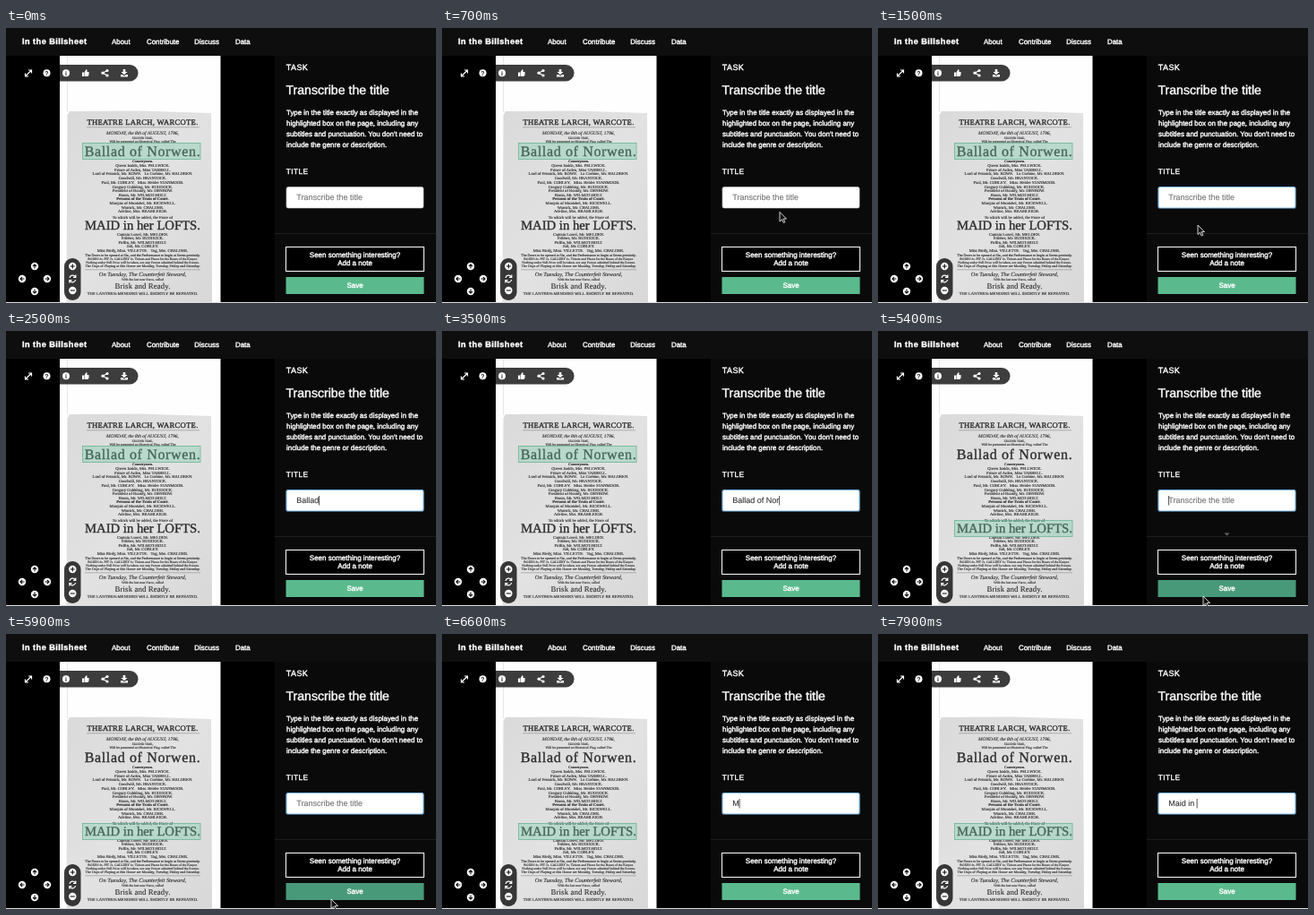
These frames come from a looping animation (480 px wide and 307 px high, 8000 ms). An HTML page:

```html
<!DOCTYPE html>
<html lang="en">
<head>
<meta charset="utf-8">
<title>Transcribe the title</title>
<style>
  html, body { margin: 0; width: 100%; height: 100%; overflow: hidden; background: #000; }
  svg { display: block; width: 100vw; height: 100vh; }
  text { font-family: "Liberation Sans", Arial, sans-serif; white-space: pre; text-rendering: geometricPrecision; }
  .ui text { fill: #fff; stroke: #fff; stroke-width: .4px; }
  .ui .dim { fill: #777; stroke: #777; stroke-width: .15px; }
  .ui .typed { fill: #333; stroke: #333; stroke-width: .1px; }
  .bold { font-weight: bold; }
  .mid { text-anchor: middle; }
  #bill text { font-family: "Liberation Serif", Times, serif; text-anchor: middle; fill: #2c2c2c; stroke: #2c2c2c; stroke-width: .12px; }
  #bill .large { stroke-width: .35px; }
  #bill .italic { font-style: italic; }
  .line { fill: none; stroke: #fff; stroke-width: 1.2; }
  .dark { fill: none; stroke: #111; stroke-width: 1.1; }
</style>
</head>
<body>
<svg viewBox="0 0 480 307">
  <defs>
    <linearGradient id="paper" x2="1" y2="1">
      <stop offset="0" stop-color="#dadada"/>
      <stop offset=".5" stop-color="#e2e2e2"/>
      <stop offset="1" stop-color="#d8d8d8"/>
    </linearGradient>
  </defs>
  <rect width="480" height="307"/>
  <rect width="480" height="31" fill="#0e0e0e"/>
  <rect x="300" y="31" width="180" height="276" fill="#0a0a0a"/>

  <rect x="60" y="31" width="179.5" height="276" fill="#fefefe"/>
  <path d="M68.5 31V94" stroke="#ddd" stroke-width=".7"/>
  <path d="M68.5 97 71 93 150 92.5 229 95 230 307H67.5Z" fill="url(#paper)"/>
  <g id="bill"></g>
  <rect id="mark" x="85.5" width="131.5" height="18" fill="#6fc9a6" fill-opacity=".36" stroke="#6db596" stroke-width=".8"/>

  <g class="ui">
    <rect x="11" y="41" width="136.5" height="18.5" rx="9.2" fill="#000" fill-opacity=".76"/>
    <g id="tools" fill="#fff">
      <path class="line" d="M22 53.5 28 47.5M25 47H28.5V50.5M21.5 50.5V54H25"/>
      <path d="M85 49.5H87V54H85ZM87.5 49.5 89.5 46.3Q91.3 46.5 90.3 49H92.5Q93 53.8 91 54H87.5Z"/>
      <path class="line" d="M113 47.5 108 50.2 113 53"/>
      <circle cx="113" cy="47.5" r="1.6"/><circle cx="108" cy="50.2" r="1.6"/><circle cx="113" cy="53" r="1.6"/>
      <path d="M130.7 46H133.3V49H135.5L132 52.3 128.5 49H130.7ZM128 52H130L132 53.6 134 52H136V54.5H128Z"/>
    </g>
    <rect x="65" y="257" width="18.5" height="47" rx="9" fill="#000" fill-opacity=".76"/>
    <g id="pads" fill="#fff"></g>

    <path d="M300 229.5H480" stroke="#1d1d1d"/>
    <path id="notch" d="M386.5 225.5H392.5L389.5 228.5Z" fill="#666"/>
    <g id="panel"></g>
    <rect id="field" x="313" y="177.5" width="153" height="23.5" rx="2" fill="#fff"/>
    <text id="entry" x="324.3" y="192.3" font-size="9"></text>
    <path id="caret" stroke="#222" stroke-width=".8"/>
    <rect x="312.5" y="244.5" width="154" height="27" fill="#000" stroke="#fff"/>
    <rect id="save" x="312.5" y="278" width="154" height="19"/>
    <g id="labels"></g>
  </g>
  <rect y="306" width="480" height="1" fill="#ddd"/>
  <path id="pointer" d="M0 0V10.5L2.5 8.2 4.2 12 5.8 11.3 4.2 7.6H7.5Z" fill="#111" stroke="#fff" stroke-width=".8"/>
</svg>
<script>
const $ = id => document.getElementById(id);
const text = (s, x, y, size, cls = '', gap = 0) =>
  `<text x="${x}" y="${y}" font-size="${size}" class="${cls}" letter-spacing="${gap}">${s}</text>`;

// Playbill lines: text, baseline, size, class, letter spacing
$('bill').innerHTML = [
  ['THEATRE LARCH, WARCOTE.', 108, 8.6, 'large', .3],
  ['MONDAY, the 8th of AUGUST, 1796,', 119, 5.4, 'italic'],
  ['SECOND TIME,', 124, 3.4],
  ['Will be presented an Historical Play, called The', 128.3, 3.9],
  ['Ballad of Norwen.', 143.2, 16, 'large', .65],
  ['Countrymen.', 150, 4, 'bold'],
  ['Queen Isolda, Mrs. PELLWICK.', 154.8, 4.6],
  ['Prince of Arden, Miss TARBELL.', 159.6, 4.6],
  ['Lord of Fennick, Mr. ROWE.   La Corbine, Mr. HALDREN.', 164.4, 4.6],
  ['Goodwill, Mr. BRANTOCK.', 169.2, 4.6],
  ['Paul, Mr. COBLEY.   Miss. Helder STANMOOR.', 174, 4.6],
  ['Gregory Gubbling, Mr. RUDDOCK.', 178.6, 4.6],
  ['President of Bounty, Mr. DENBOW.', 183.2, 4.6],
  ['Baron, Mr. WILMOT-HOLT.', 187.6, 4.6],
  ['Persons of the Train of Court.', 192.4, 4.6, 'bold'],
  ['Marquis of Montabel, Mr. RICKWELL.', 197.2, 4.6],
  ['Warrick, Mr. CHALDER.', 201.6, 4.6],
  ['Adeline, Mrs. BRAMLEIGH.', 206, 4.6],
  ['To which will be added, the Farce of', 213, 4.6],
  ['MAID in her LOFTS.', 225, 14.7, 'large'],
  ['Captain Lorrel, Mr. MELDEN.', 232, 4.6],
  ['Fribber, Mr. RUDDOCK.', 236.4, 4.6],
  ['Puffin, Mr. WILMOT-HOLT.', 240.8, 4.6],
  ['Jolt, Mr. COBLEY.', 245, 4.6],
  ['Miss Birdy, Miss. VILLETTE.   Tag, Mrs. CHALDER.', 249.5, 4.6],
  ['The Doors to be opened at Six, and the Performance to begin at Seven precisely.', 254.5, 4],
  ['BOXES 4s. PIT 2s. GALLERY 1s. Tickets and Places for the Boxes of the Keeper.', 258.6, 3.7],
  ['Nothing under Full Price will be taken, nor any Person admitted behind the Scenes.', 262.8, 3.8],
  ['The Days of Playing at this House are Monday, Tuesday, Friday and Saturday.', 267.2, 4.1],
  ['On Tuesday, The Counterfeit Steward,', 276.5, 6.4, 'italic'],
  ['With the last new Farce, called', 282, 3.8],
  ['Brisk and Ready.', 291, 8.8, '', .1],
  ['THE LANTERN-MENDERS WILL SHORTLY BE REPEATED.', 298, 4.7]
].map(([s, ...rest]) => text(s, 152.5, ...rest)).join('') +
  '<path d="M90 110.8H216M88 269.8H217" stroke="#777" stroke-width=".5"/>';

const badge = (s, x) => `<circle cx="${x}" cy="50.3" r="4"/>` +
  `<text x="${x}" y="52.8" font-size="7" class="mid bold" style="fill:#222;stroke:none">${s}</text>`;
$('tools').innerHTML += badge('?', 45.5) + badge('i', 67);

const pad = (x, y, d, turn = 0) => `<g transform="translate(${x} ${y}) rotate(${turn})">
  <circle r="4.2"/><path class="dark" d="${d}"/></g>`;
const arrow = 'M0 2.6V-2M-2.1 .2 0-2.1 2.1 .2';
$('pads').innerHTML = pad(32, 266, arrow) + pad(46, 280, arrow, 90) +
  pad(32, 294, arrow, 180) + pad(18, 280, arrow, 270) +
  pad(74.3, 266, 'M-2.5 0H2.5M0-2.5V2.5') + pad(74.3, 293, 'M-2.5 0H2.5') +
  '<path class="line" d="M71 279A3.5 3.5 0 0 1 77.4 277.7M77.8 275.5V278.3H75M77.6 281A3.5 3.5 0 0 1 71.2 282.3M70.8 284.5V281.7H73.6"/>';

$('panel').innerHTML =
  text('In the Billsheet', 18, 18, 9.2, 'bold', .45) +
  [['About', 118], ['Contribute', 157], ['Discuss', 210.3], ['Data', 256]]
    .map(([s, x]) => text(s, x, 18, 7.9)).join('') +
  text('TASK', 312.8, 46.5, 9, '', .4) +
  text('Transcribe the title', 312.5, 74.3, 14.1) +
  ['Type in the title exactly as displayed in the',
   'highlighted box on the page, including any',
   'subtitles and punctuation. You don\'t need to',
   'include the genre or description.']
    .map((s, i) => text(s, 313, 96.7 + i * 12, 7.88)).join('') +
  text('TITLE', 312.8, 163, 8.3, '', .4);

$('labels').innerHTML =
  text('Seen something interesting?', 389.5, 256.3, 8, 'mid') +
  text('Add a note', 389.5, 265.2, 8, 'mid') +
  text('Save', 389.5, 290, 8, 'mid');

const LOOP = 8000, FOCUS = 1000, SUBMIT = 5300;
const rounds = [
  { title: 'Ballad of Norwen', start: 1700, step: 150, focus: FOCUS, y: 128.5 },
  { title: 'Maid in her Lofts', start: 6500, step: 180, focus: SUBMIT, y: 211.5 }
];
// Pointer stops: time, x, y
const stops = [[300, 484, 250], [900, 340, 190], [1050, 340, 190], [1400, 357, 220],
  [4700, 357, 220], [5150, 363, 296], [LOOP, 363, 296]];

function pointerAt(t) {
  const i = stops.findIndex(s => s[0] > t);
  if (i < 1) return [484, 250];
  const [t0, x0, y0] = stops[i - 1], [t1, x1, y1] = stops[i];
  const p = (t - t0) / (t1 - t0), k = p * p * (3 - 2 * p);
  return [x0 + (x1 - x0) * k, y0 + (y1 - y0) * k];
}

function set(id, attrs) {
  for (const name in attrs) $(id).setAttribute(name, attrs[name]);
}

function draw(t) {
  const round = rounds[t < SUBMIT ? 0 : 1];
  const count = t < round.start ? 0
    : Math.min(round.title.length, 1 + Math.floor((t - round.start) / round.step));
  const typed = round.title.slice(0, count);
  const focused = t >= FOCUS;
  const entry = $('entry');
  entry.textContent = typed || 'Transcribe the title';
  entry.setAttribute('class', typed ? 'typed' : 'dim');

  const lastKey = count ? round.start + (count - 1) * round.step : round.focus;
  const lit = focused && Math.floor((t - lastKey) / 500) % 2 === 0;
  const x = 324.6 + (typed ? entry.getComputedTextLength() : 0);
  set('caret', { d: `M${x} 184V194.5`, opacity: +lit });
  set('field', { stroke: focused ? '#7db8e8' : '#ccc', 'stroke-width': focused ? 1.2 : .6 });
  set('mark', { y: round.y });
  set('notch', { opacity: +(t >= SUBMIT && t < SUBMIT + 400) });

  const [px, py] = pointerAt(t);
  const shown = t < 1700 || (t >= 4700 && t < 6500);
  set('pointer', { transform: `translate(${px} ${py})`, opacity: +shown });
  set('save', { fill: shown && py > 278 ? '#48997a' : '#5aba8d' });
}

function tick() {
  draw(performance.now() % LOOP);
  requestAnimationFrame(tick);
}
tick();
</script>
</body>
</html>
```
